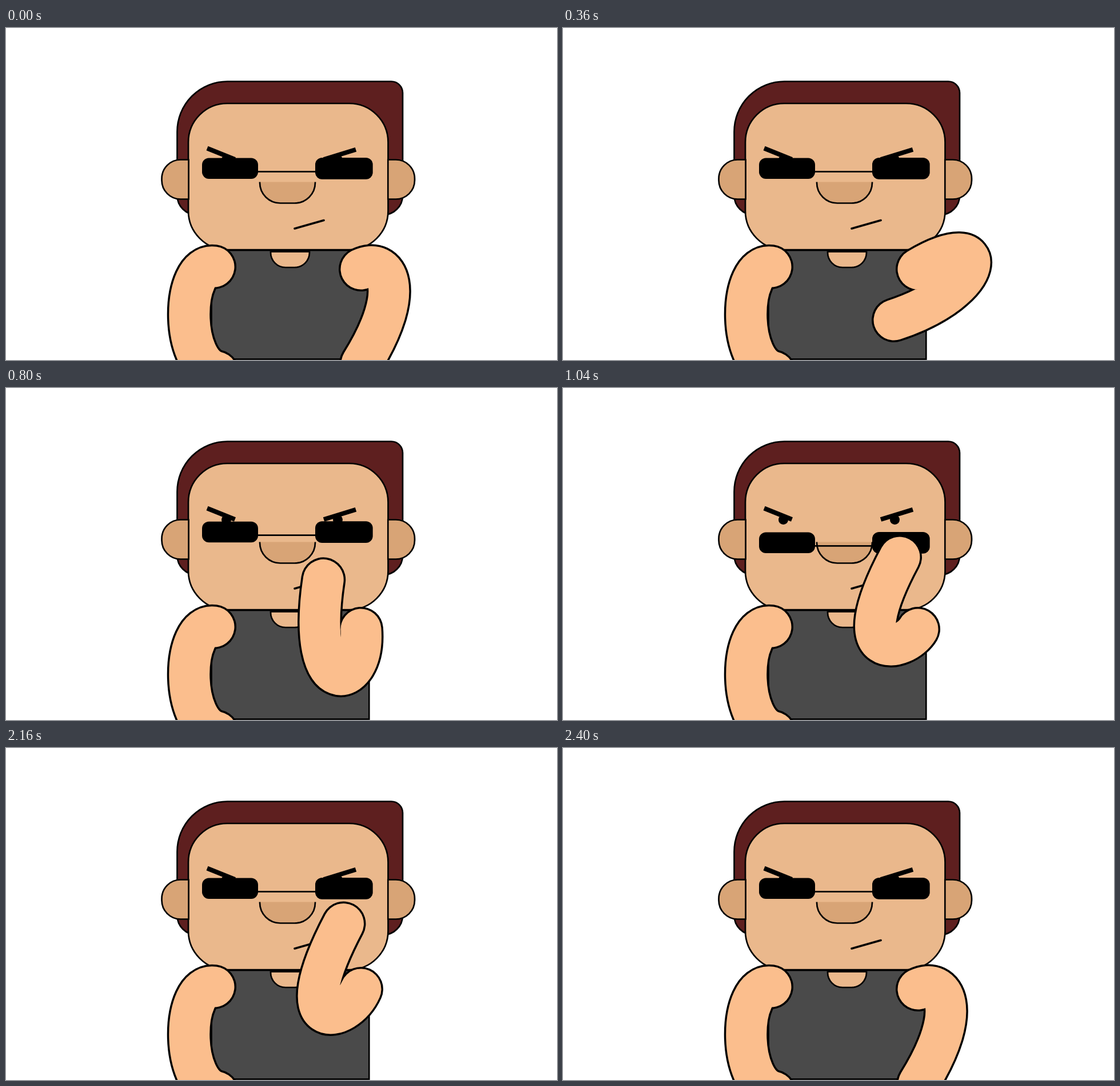
Animation, 964 px wide and 581 px high, one loop 2520 ms. Source, as an HTML page:

```html
<!DOCTYPE html>
<html lang="en">
<head>
<meta charset="utf-8">
<title>Sunglasses</title>
<style>
  html, body { margin: 0; width: 100%; height: 100%; overflow: hidden; background: #fff; }
  svg { display: block; width: 964px; height: 581px; }
  .line { stroke: #000; stroke-width: 2.7; }
  .skin { fill: #eab88c; }
  .shade { fill: #d8a476; }
  .limb { fill: none; stroke-linecap: round; stroke-linejoin: round; }
  .edge { stroke: #000; stroke-width: 78; }
  .flesh { stroke: #fbbe8d; stroke-width: 71; }
</style>
</head>
<body>
<svg viewBox="0 0 964 581" xmlns="http://www.w3.org/2000/svg">
  <path class="line" fill="#5e1f1f" d="M299.5 181.5a88 88 0 0 1 88-88H674a20 20 0 0 1 20 20V293a34 34 0 0 1-34 34H333.500a34 34 0 0 1-34-34z"/>
  <rect class="line" fill="#4a4a4a" x="359.500" y="389" width="275.800" height="190.500"/>
  <rect class="line skin" x="319" y="132" width="349.500" height="256" rx="68"/>
  <path class="line shade" d="M319.500 230.500V299.500H305.500a33 33 0 0 1-33-33V263.500a33 33 0 0 1 33-33z"/>
  <path class="line shade" d="M668.300 230.500V299.500H682a33 33 0 0 0 33-33V263.500a33 33 0 0 0-33-33z"/>
  <path class="line skin" d="M463 391.500H531V393a26 26 0 0 1-26 26H489a26 26 0 0 1-26-26z"/>
  <path class="line shade" d="M444 269.500V270.500a36 36 0 0 0 36 36H505a36 36 0 0 0 36-36V269.500"/>
  <path d="M505 351L556 336.500" stroke="#000" stroke-width="3.600" stroke-linecap="round"/>
  <path d="M352 210.500L400.500 230M556 230L612 212.700" stroke="#000" stroke-width="8"/>
  <circle cx="385.500" cy="230.500" r="8.500"/>
  <circle cx="580.500" cy="230.500" r="8.500"/>
  <g id="glasses">
    <rect x="343" y="227.500" width="98" height="36.500" rx="12"/>
    <rect x="541" y="227" width="100.700" height="37.700" rx="12"/>
    <path class="line" d="M440 251.300H542"/>
  </g>
  <g id="leftArm" class="limb"><path class="edge"/><path class="flesh"/></g>
  <g id="rightArm" class="limb"><path class="edge"/><path class="flesh"/></g>
</svg>
<script>
const LOOP = 2520, STEP = 40, GLASSES_DROP = 25;
const byId = id => document.getElementById(id);
const glasses = byId('glasses'), leftArm = byId('leftArm'), rightArm = byId('rightArm');
const shoulder = { x: 621, y: 422 };

// A pose is the hand's place plus the direction and reach of the curve at both ends.
const pose = (x, y, upperAngle, upperReach, lowerAngle, lowerReach) =>
  ({ x, y, upperAngle, upperReach, lowerAngle, lowerReach });

const rest = pose(622, 587, -27, 49, -58, 155);
const swing = pose(579, 511, -31, 153, -18, 174);
const lift = pose(551.5, 410.5, 29, 169, 55, 243);
const reach = pose(544, 348.5, 74, 130, 92, 220);
const touch = pose(589, 296, 120, 45, 118, 218);
const lower = pose(595, 342, 96, 133, 117, 237);
const fling = pose(612, 470, -46, 301, -53, 350);

const clamp01 = v => Math.min(1, Math.max(0, v));
const progress = (t, from, to) => clamp01((t - from) / (to - from));

function mix(a, b, u) {
  return Object.fromEntries(Object.keys(a).map(k => [k, a[k] + (b[k] - a[k]) * u]));
}

// Each move leads from the pose before it to a new one.
const moves = [
  { from: 160, to: 360, pose: swing },
  { from: 360, to: 600, pose: lift },
  { from: 600, to: 720, pose: reach },
  { from: 720, to: 1040, pose: touch },
  { from: 2120, to: 2280, pose: lower },
  { from: 2280, to: 2360, pose: fling },
  { from: 2360, to: 2400, pose: rest }
];
const armAt = t => moves.reduce((now, m) => mix(now, m.pose, progress(t, m.from, m.to)), rest);

function handle({ x, y }, degrees, length) {
  const angle = degrees * Math.PI / 180;
  return { x: x + length * Math.cos(angle), y: y + length * Math.sin(angle) };
}

function drawArm(arm, start, c1, c2, end) {
  const [p0, p1, p2, p3] = [start, c1, c2, end].map(p => `${p.x} ${p.y}`);
  for (const path of arm.children) path.setAttribute('d', `M${p0}C${p1} ${p2} ${p3}`);
}

function render(time) {
  const t = Math.floor(time % LOOP / STEP) * STEP;
  const hand = armAt(t);
  drawArm(rightArm, shoulder,
    handle(shoulder, hand.upperAngle, hand.upperReach),
    handle(hand, hand.lowerAngle, hand.lowerReach), hand);
  const drop = GLASSES_DROP * (progress(t, 720, 1040) - progress(t, 1800, 1920));
  glasses.setAttribute('transform', `translate(0 ${drop})`);
}

drawArm(leftArm, { x: 364, y: 418 }, { x: 307, y: 411 }, { x: 304, y: 588 }, { x: 369, y: 602 });
render(0);

let begin;
function tick(now) {
  begin ??= now;
  render(now - begin);
  requestAnimationFrame(tick);
}
requestAnimationFrame(tick);
</script>
</body>
</html>
```
